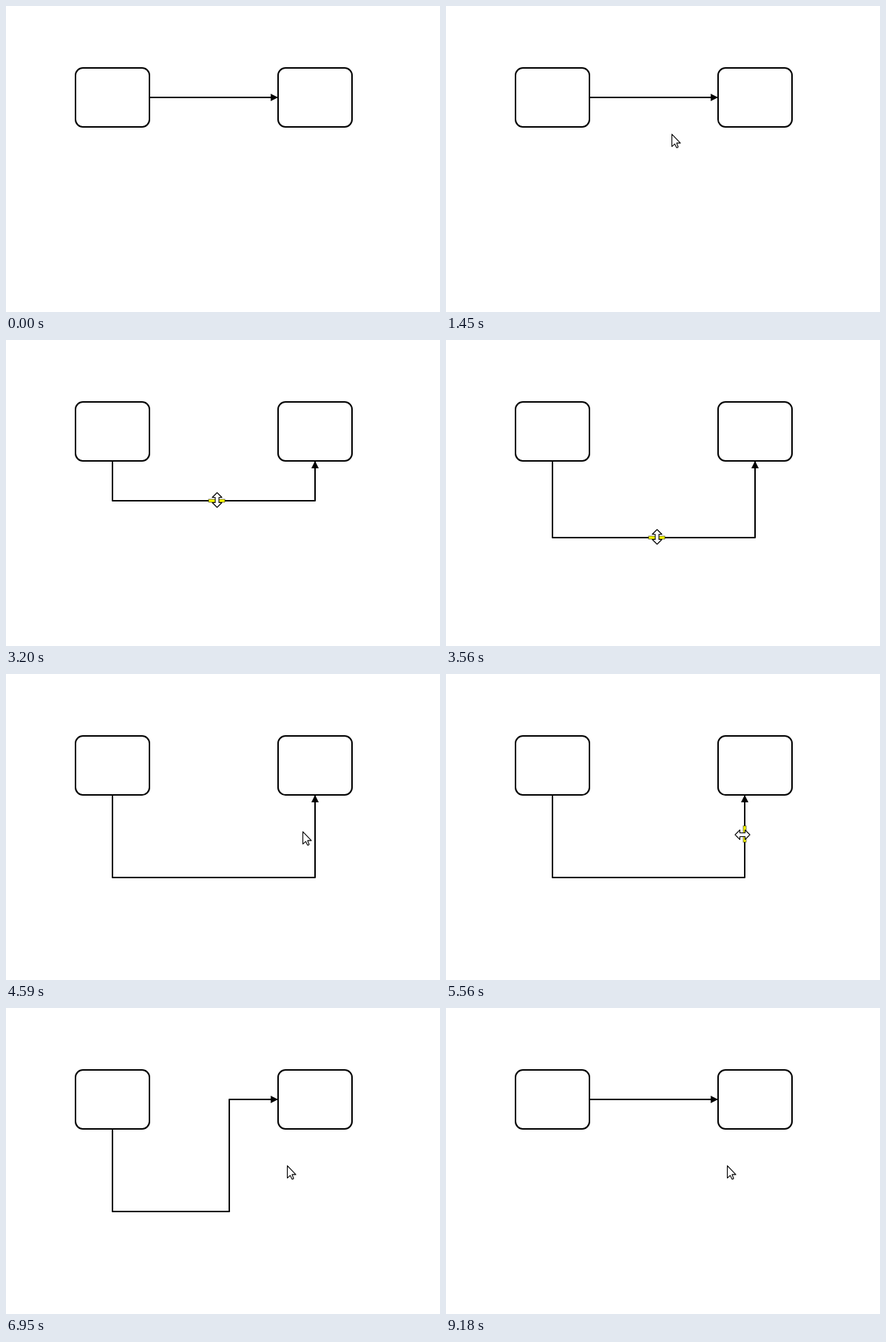
Write an HTML page that moves like this. It is 587x415 px and loops after 9.69 s.

```html
<!DOCTYPE html>
<html lang="en">
<head>
<meta charset="utf-8">
<title>Moving connection segments</title>
<style>
  html, body { margin: 0; width: 100%; height: 100%; overflow: hidden; background: #fff; }
  svg { display: block; }
  .shape { fill: #fff; stroke: #000; stroke-width: 2; }
  .line { fill: none; stroke: #000; stroke-width: 2; stroke-linejoin: round; }
  .handle { fill: #ff0; stroke: #0008; }
  .cursor { fill: #fff; stroke: #000; stroke-width: 1.1; stroke-linejoin: round; }
</style>
</head>
<body>
<svg width="587" height="415" viewBox="0 0 587 415">
  <rect class="shape" x="94" y="84" width="100" height="80" rx="10"/>
  <rect class="shape" x="368" y="84" width="100" height="80" rx="10"/>
  <polyline class="line" id="line"/>
  <path id="head" d="M0 0L-10-5V5Z"/>
  <rect class="handle" id="handle" x="-11" y="-2" width="22" height="4"/>
  <path class="cursor" id="cursor"/>
</svg>
<script>
const LOOP = 9690, STEP = 40;
const POINTER = 'M.5 .8V17.6L4.4 14.1L6.8 19Q8.6 19.4 9 18L6.9 12.9H12Z';
const RESIZE = 'M0-10L6.5-3.5H2.5V3.5H6.5L0 10L-6.5 3.5H-2.5V-3.5H-6.5Z';

// Pointer moves: start, end, target x, target y, ease-out power
const moves = [
  [970, 1570, 302, 158, 1.7],
  [1740, 2230, 285, 123, 1.5],
  [2760, 2760, 285, 127, 1],
  [2800, 3560, 285, 267, 1.3],
  [3600, 3680, 285, 275, 1],
  [4120, 4590, 401, 213, 1.6],
  [4630, 5070, 416, 218, 1.4],
  [5250, 5250, 415, 219, 1],
  [5560, 6440, 299, 214, 2.86],
  [6670, 6950, 380, 213, 1.6]
];

const el = id => document.getElementById(id);
const line = el('line'), head = el('head'), handle = el('handle'), cursor = el('cursor');
const place = (node, x, y, turn = 0) =>
  node.setAttribute('transform', `translate(${x} ${y}) rotate(${turn})`);
const show = (node, on) => node.style.display = on ? '' : 'none';

function pointerAt(t) {
  let x = 361, y = 412;
  for (const [start, end, toX, toY, power] of moves) {
    if (t < start) break;
    const steps = Math.floor((t - start + 10) / STEP) + 1;
    const p = t >= end ? 1 : Math.min(1, steps * STEP / (end - start + STEP));
    const k = 1 - (1 - p) ** power;
    x += (toX - x) * k;
    y += (toY - y) * k;
  }
  return [Math.round(x), Math.round(y)];
}

// Waypoints for a horizontal segment at y and a vertical one at x
function route(x, y) {
  if (y <= 164) return [[194, y], [368, y]];
  const points = [[144, 164], [144, y], [x, y]];
  return points.concat(x >= 368 ? [[x, 164]] : [[x, 124], [368, 124]]);
}

function draw(t) {
  const [cx, cy] = pointerAt(t);

  let y = t < 2760 || t >= 9180 ? 124 : t < 4120 ? cy + 1 : 276;
  if (Math.abs(y - 124) < 5) y = 124;
  const x = t < 5560 || t >= 8760 ? 418 : t < 6670 ? cx + 3 : 302;

  const points = route(x, y), [endX, endY] = points[points.length - 1];
  line.setAttribute('points', points.join(' '));
  place(head, endX, endY, endY === 164 && y > 164 ? -90 : 0);

  const vertical = t < 4120 && (t >= 2760 || cy < 131);
  const sideways = t >= 4590 && t < 6670 && (t >= 5560 || cx > 410);
  show(handle, vertical || sideways);
  if (vertical) place(handle, t >= 2800 && t < 3720 ? cx : 281, y);
  if (sideways) place(handle, x, t < 5560 ? 220 : t < 6440 ? cy - 1 : 200, 90);

  show(cursor, t >= 970);
  cursor.setAttribute('d', vertical || sideways ? RESIZE : POINTER);
  place(cursor, cx + (vertical ? .5 : 0), cy, sideways ? 90 : 0);
}

const begin = performance.now();
function tick() {
  draw((performance.now() - begin) % LOOP);
  requestAnimationFrame(tick);
}
tick();
</script>
</body>
</html>
```
